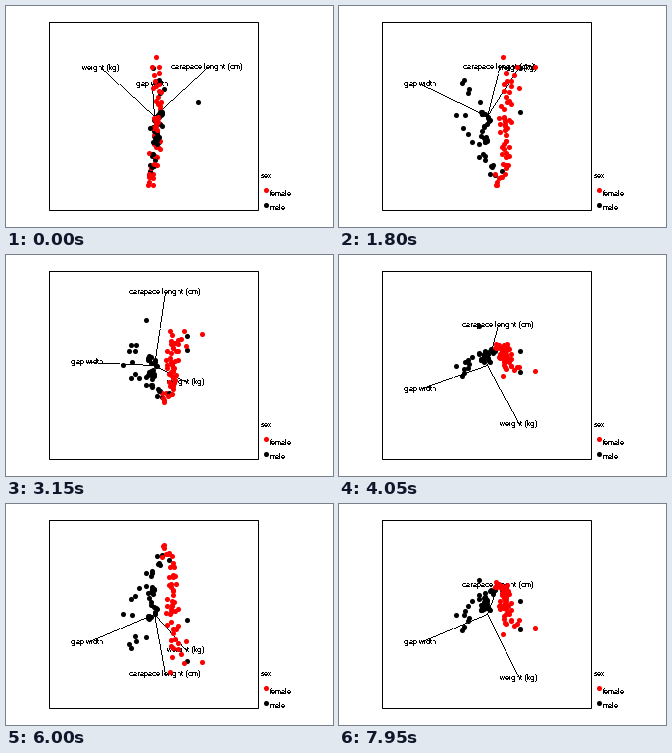
These frames come from a looping animation (327 by 221 pixels, 8000 ms). A matplotlib script:

```python
import numpy as np
import matplotlib.pyplot as plt
from matplotlib.animation import FuncAnimation
from matplotlib.collections import PolyCollection

W, H, DPI = 327, 221, 128
PX = 72 / DPI                      # one pixel in points
CENTER = np.array([148.0, 110.0])
RADIUS = 75
RED, BLACK = "#ff0000", "#000000"
PIXEL = np.array([(0, 0), (1, 0), (1, 1), (0, 1)])

# Axes are (final horizontal direction, two directions of the rotating plane).
VARIABLES = {
    "weight (kg)": (0.427, -0.227, 0.874),
    "gap width": (-0.893, 0.040, 0.475),
    "carapace lenght (cm)": (0.147, 0.973, 0.186),
}

SIDE_START, SIDE_SPEED = 101, 8.3  # degrees, degrees per step
UP_TURN = [(14, 60), (21, 0), (28, -54), (29, -54), (36, -108),
           (41, -140), (53, -56)]  # step, degrees

rng = np.random.default_rng(8)


def group(count, x_start, x_end, x_spread, q_start, q_end):
    """Points along a line in (x, q), bent onto the sheet the data lies on."""
    t = np.linspace(0, 1, count)
    x = x_start + (x_end - x_start) * t + rng.normal(0, x_spread, count) - CENTER[0]
    q = q_start + (q_end - q_start) * t + rng.normal(0, 2, count)
    depth = 4.5 - 0.0015 * q ** 2 + rng.normal(0, 2.5, count)
    p = 0.65 * q + 0.213 * x + 1.21 * depth
    return np.column_stack([x, p, q])


def outliers(*places):
    return np.array(places) - (CENTER[0], 0, 0)


females = np.vstack([
    outliers((164, 34, 48), (196, 31, 38), (178, 34, 36)),
    group(32, 163, 168, 3.2, -61, -5),
    group(18, 167, 173, 4.5, -8, 33),
])
males = np.vstack([
    outliers((140, 45, -10), (181, 29, 38), (181, 15, -5)),
    group(4, 123, 130, 2, 30, 17),
    group(5, 119, 133, 1.5, 4, -24),
    group(22, 147, 144, 3.3, -28, 4),
    group(10, 159, 144, 3, -51, -33),
])
points = np.vstack([females, males])
colors = np.array([RED] * len(females) + [BLACK] * len(males))
order = rng.permutation(len(points))
points, colors = points[order], colors[order]
tips = RADIUS * np.array(list(VARIABLES.values()))


def projection(step):
    up = np.radians(np.interp(step, *zip(*UP_TURN)))
    side = np.radians(max(0, SIDE_START - SIDE_SPEED * step))
    c, s = np.cos(up), np.sin(up)
    horizontal = np.cos(side), np.sin(side) * s, -np.sin(side) * c
    return np.column_stack([horizontal, (0, c, s)])


def to_stage(data, basis):
    return CENTER + data @ basis * (1, -1)


def line_pixels(end):
    """Unit squares of a one pixel wide line from the center."""
    count = int(np.abs(end - CENTER).max()) + 1
    cells = np.floor(np.linspace(CENTER, end, count) + 0.5)
    return cells[:, None] + PIXEL


plt.rcParams.update({
    "font.family": "Liberation Sans",
    "font.size": 8 * PX,
    "text.antialiased": False,
    "text.hinting": "default",
    "text.hinting_factor": 1,
})

fig = plt.figure(figsize=(W / DPI, H / DPI), dpi=DPI, facecolor="white")
ax = fig.add_axes([0, 0, 1, 1])
ax.set(xlim=(0, W), ylim=(H, 0))
ax.axis("off")

dot_style = dict(s=(5.1 * PX) ** 2, linewidths=0)

ax.plot([43, 252, 252, 43, 43], [16, 16, 204, 204, 16], color=BLACK, lw=PX,
        solid_joinstyle="miter")
ax.text(255, 170, "sex", va="center")
ax.scatter([260.5, 260.5], [184.5, 199.5], c=[RED, BLACK], **dot_style)
ax.text(263.5, 187.5, "female", va="center")
ax.text(263.5, 202.5, "male", va="center")

lines = PolyCollection([], facecolors=BLACK, linewidths=0, zorder=2)
ax.add_collection(lines, autolim=False)
labels = [ax.text(0, 0, name, ha="center", va="center", zorder=2)
          for name in VARIABLES]
cloud = ax.scatter(points[:, 0], points[:, 1], c=colors, zorder=3, **dot_style)


def update(frame):
    basis = projection(frame // 3)
    cloud.set_offsets(np.floor(to_stage(points, basis)) + 0.5)
    ends = to_stage(tips, basis)
    lines.set_verts(np.concatenate([line_pixels(end) for end in ends]))
    for label, end in zip(labels, ends):
        label.set_position(end)
    return [cloud, lines, *labels]


anim = FuncAnimation(fig, update, frames=160, interval=50, repeat=True)
plt.show()
```
